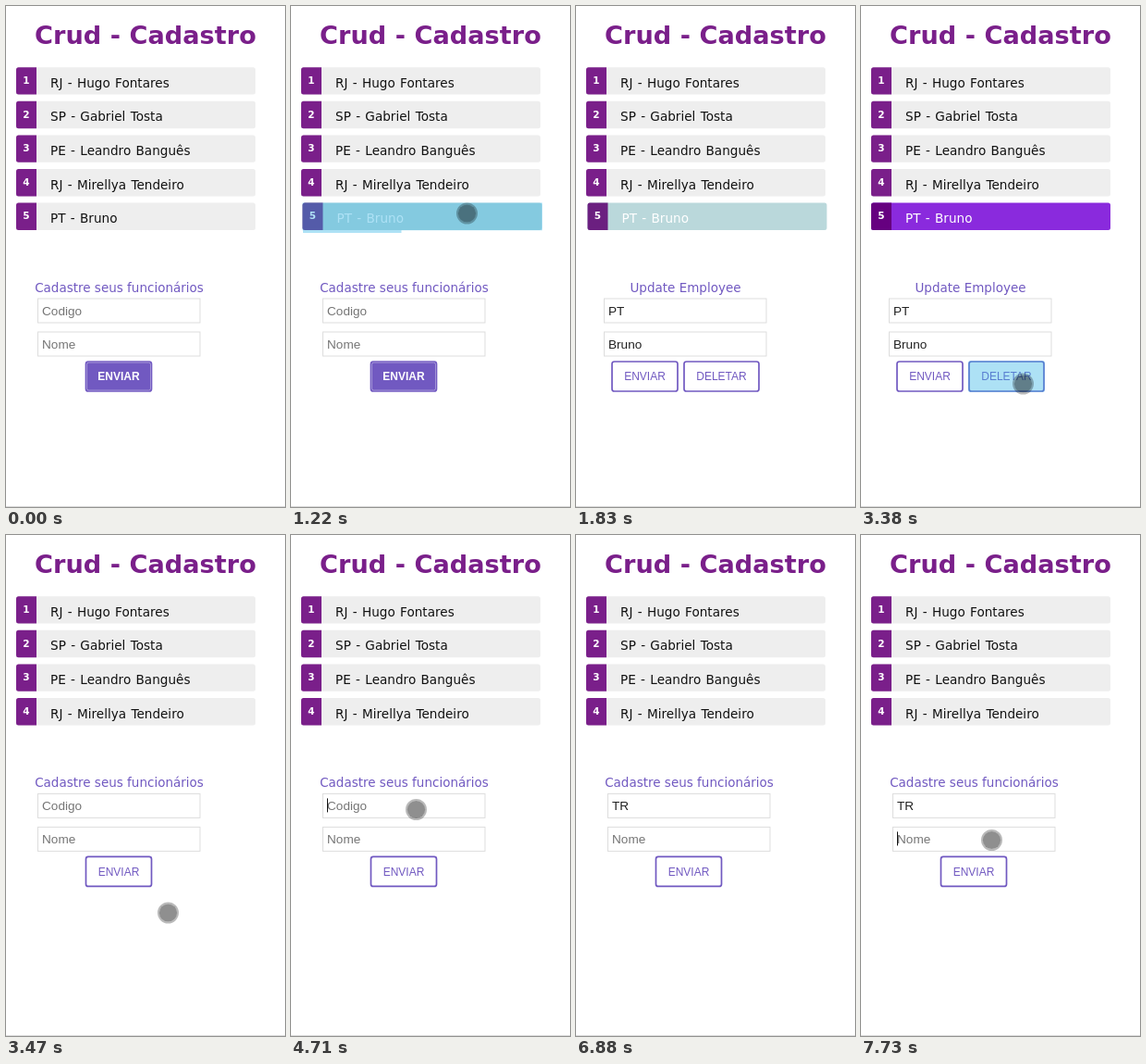
These frames come from a looping animation (302 by 541 pixels, 8000 ms). An HTML page:

```html
<!DOCTYPE html>
<html lang="pt">
<head>
<meta charset="utf-8">
<title>Crud - Cadastro</title>
<style>
  html, body { margin: 0; width: 100%; height: 100%; overflow: hidden; background: #fff; }
  svg { display: block; width: 100%; height: 100%; }
  text { font: 13.6px "DejaVu Sans", Verdana, sans-serif; white-space: pre; }
  .title { font-size: 27.2px; font-weight: bold; fill: #7a1f8a; }
  .mid { text-anchor: middle; }
  .item { word-spacing: 1px; }
  .badge { font-size: 10.5px; font-weight: bold; fill: #fff; }
  .heading { fill: #7159c1; font-size: 13.5px; }
  .field { font-family: "Liberation Sans", Arial, sans-serif; }
  .button { font-family: "Liberation Sans", Arial, sans-serif; font-size: 12px; }
</style>
</head>
<body>
<svg id="stage" viewBox="0 0 302 541"></svg>
<script>
const LOOP = 8000;
const PURPLE = '#7159c1';
const TAP = '#33b5e5';
const ROW_PITCH = 36.6;
const people = ['RJ - Hugo Fontares', 'SP - Gabriel Tosta', 'PE - Leandro Banguês',
  'RJ - Mirellya Tendeiro', 'PT - Bruno'];
const stage = document.getElementById('stage');

const between = (t, from, to) => t >= from && t < to;
const progress = (t, from, to) => Math.min(1, Math.max(0, (t - from) / (to - from)));

const rect = (x, y, w, h, fill, more = '') =>
  `<rect x="${x}" y="${y}" width="${w}" height="${h}" fill="${fill}" ${more}/>`;
const text = (x, y, label, kind, fill = '') =>
  `<text x="${x}" y="${y}" class="${kind}" ${fill && `fill="${fill}"`}>${label}</text>`;

const rowStyles = {
  plain: { dx: 0, badge: '#7a1f8a', back: '#eee', ink: '#111' },
  hover: { dx: 1.5, badge: '#6b1f80', back: '#bad8db', ink: '#fff' },
  focus: { dx: 0, badge: '#660080', back: '#8a2add', ink: '#fff' }
};

function row(index, state) {
  const { dx, badge, back, ink } = rowStyles[state];
  const y = 66.2 + index * ROW_PITCH;
  return `<g transform="translate(${dx} ${y})">`
    + rect(11, 0, 259, 29.4, back, 'rx="2.5"')
    + `<path d="M33 0H13.5Q11 0 11 2.5V26.9Q11 29.4 13.5 29.4H33Z" fill="${badge}"/>`
    + text(22, 17.8, index + 1, 'badge mid')
    + text(48, 21.6, people[index], 'item', ink) + '</g>';
}

function field(x, y, value, placeholder, caretAt) {
  const caret = caretAt === undefined ? '' : rect(x + 5 + caretAt, y + 5.5, 1, 15, '#111');
  return rect(x + .5, y + .5, 175.5, 26, '#fff', 'stroke="#ddd"')
    + text(x + 5, y + 18, value || placeholder, 'field', value ? '#222' : '#757575') + caret;
}

// fill: 1 is the focused solid look, 0 the outlined one
function button(x, y, w, label, fill = 0) {
  const ink = fill > .5 ? '#fff' : PURPLE;
  const weight = fill > .5 ? 'font-weight="bold"' : '';
  return rect(x + 1, y + 1, w - 2, 32, '#fff', `rx="2.5" stroke="${PURPLE}" stroke-width="1.7"`)
    + rect(x + 1, y + 1, w - 2, 32, PURPLE, `rx="2.5" opacity="${fill}"`)
    + rect(x + 2, y + 2, w - 4, 30, 'none', `rx="2" stroke="#fff" stroke-opacity="${fill * .35}"`)
    + `<g ${weight}><text x="${x + w / 2}" y="${y + 21.2}" class="button mid" fill="${ink}"
        style="font-weight:inherit">${label}</text></g>`;
}

const touch = (x, y) =>
  `<circle cx="${x}" cy="${y}" r="9.6" fill-opacity=".44"/>
   <circle cx="${x}" cy="${y}" r="10.5" fill="none" stroke="#000" stroke-opacity=".27" stroke-width="2"/>`;

function createForm(t, y) {
  const value = t < 6040 ? '' : t < 6420 ? 'T' : 'TR';
  const codeCaret = between(t, 4710, 5260) || between(t, 5720, 6880) || between(t, 7420, 7730);
  const caretX = [0, 8.5, 18.3][value.length];
  return text(122.5, y + 308.5, 'Cadastre seus funcionários', 'heading mid')
    + field(34, y + 315.5, value, 'Codigo', codeCaret ? caretX : undefined)
    + field(34, y + 351.5, '', 'Nome', t >= 7730 ? 0 : undefined)
    + button(85.5, y + 383, 73, 'ENVIAR', t < 3470 ? 1 : 0);
}

function updateForm(t) {
  return text(118.5, 308.5, 'Update Employee', 'heading mid')
    + field(30, 315.5, 'PT', '')
    + field(30, 351.5, 'Bruno', '')
    + button(38, 383, 73, 'ENVIAR', 1 - progress(t, 1400, 1700))
    + button(116, 383, 83, 'DELETAR')
    + (t >= 3380 ? rect(116, 383, 83, 34, TAP, 'rx="2.5" opacity=".4"') : '');
}

function touches(t) {
  if (between(t, 1220, 1800)) return touch(190.5, 224);
  if (between(t, 3380, 3850)) return touch(175.5, 408);
  if (between(t, 4710, 5660)) return touch(135.5, 296.5);
  return t >= 7730 ? touch(141.5, 329.5) : '';
}

function draw(time) {
  const t = between(time, 1220, 1830) ? 1220 + Math.floor((time - 1220) / 76) * 76 : time;
  const deleted = t >= 3470;
  let out = text(151, 41, 'Crud - Cadastro', 'title mid');
  for (let i = 0; i < 4; i++) out += row(i, 'plain');
  if (!deleted) out += row(4, t < 1220 ? 'plain' : t < 3380 ? 'hover' : 'focus');
  if (between(t, 1220, 1830)) {
    const glow = .4 * (1 - progress(t, 1450, 1752));
    out += `<path d="M12.5 212.6H272V242.2H119.5V245H13V242.2H12.5Z" fill="${TAP}" opacity="${glow}"/>`;
  }
  out += between(t, 1290, 3470) ? updateForm(t) : createForm(t, deleted ? -ROW_PITCH : 0);
  out += touches(t) + rect(0, 540, 302, 1, '#ddd');
  return out;
}

let shown = '';
const start = performance.now();
function tick() {
  const picture = draw((performance.now() - start) % LOOP);
  if (picture !== shown) stage.innerHTML = shown = picture;
  requestAnimationFrame(tick);
}
tick();
</script>
</body>
</html>
```
